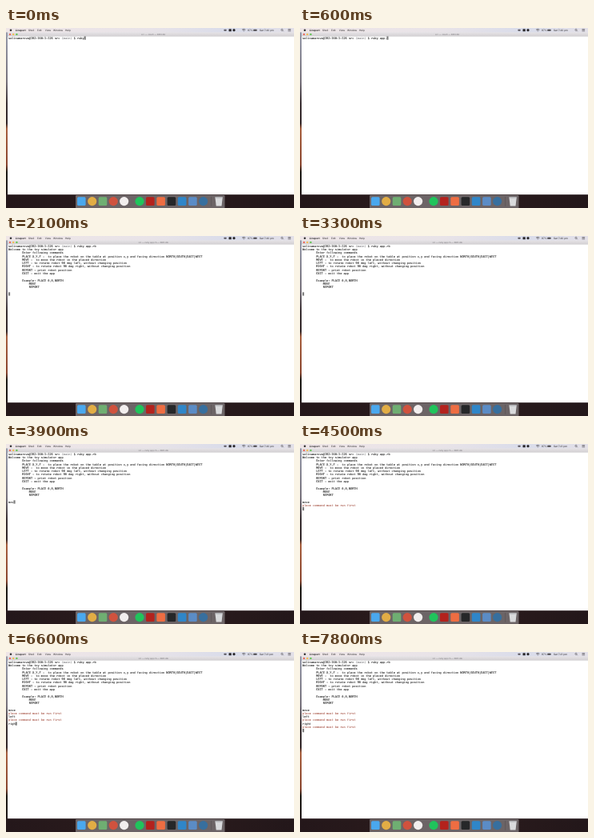
An HTML page that plays this animation: 360 px wide and 225 px high, repeating every 8 s.

```html
<!DOCTYPE html>
<html lang="en">
<head>
<meta charset="utf-8">
<title>Toy simulator session</title>
<style>
html, body { margin: 0; width: 100%; height: 100%; overflow: hidden; background: #22171a; }
svg { display: block; width: 100%; height: 100%; }
text { white-space: pre; text-rendering: geometricPrecision; fill: currentColor; }
.ui { font: 3.15px Inter, "Open Sans", sans-serif; color: #2c2a2d; }
.mono { font: 3.571px "DejaVu Sans Mono", monospace; color: #2e2e2e; stroke: currentColor; stroke-width: .1px; }
.bold { font-weight: 700; }
.title { font-size: 2.7px; color: #77757a; text-anchor: middle; }
.error { color: #ad5f52; }
.dim { color: #808084; }
</style>
</head>
<body>
<svg viewBox="0 0 360 225" preserveAspectRatio="none">
  <defs>
    <linearGradient id="edge" x2="0" y2="1">
      <stop offset="0" stop-color="#9a9fb0"/>
      <stop offset=".3" stop-color="#77727c"/>
      <stop offset=".42" stop-color="#3a3033"/>
      <stop offset=".53" stop-color="#33282a"/>
      <stop offset=".56" stop-color="#a8603f"/>
      <stop offset=".76" stop-color="#8a4630"/>
      <stop offset=".8" stop-color="#1d1b17"/>
      <stop offset="1" stop-color="#22171a"/>
    </linearGradient>
    <linearGradient id="floor">
      <stop offset="0" stop-color="#24171a"/>
      <stop offset=".5" stop-color="#2c1c1d"/>
      <stop offset="1" stop-color="#23171a"/>
    </linearGradient>
    <linearGradient id="menu">
      <stop offset="0" stop-color="#efe6e7"/>
      <stop offset=".5" stop-color="#e8e3e8"/>
      <stop offset=".78" stop-color="#d9dcea"/>
      <stop offset="1" stop-color="#e3e0e8"/>
    </linearGradient>
    <linearGradient id="bar" x2="0" y2="1">
      <stop offset="0" stop-color="#e6e3e6"/>
      <stop offset="1" stop-color="#d3d0d3"/>
    </linearGradient>
  </defs>
  <rect width="360" height="225" fill="url(#edge)"/>
  <rect y="207" width="360" height="18" fill="url(#floor)"/>
  <rect x="2" y="5.3" width="358" height="202.9" fill="#fff"/>
  <rect x="2" y="5.3" width="358" height="5" fill="url(#bar)"/>
  <rect x="2" y="10.1" width="358" height=".3" fill="#b9b6b9"/>
  <rect width="360" height="5.4" fill="url(#menu)"/>
  <g id="chrome"></g>
  <g id="dock"></g>
  <g id="screen"></g>
</svg>
<script>
const LOOP = 8000, STEP = 300;
const CHAR = 2.15, LINE = 4.28, LEFT = 3, BASE = 13.7;
const $ = id => document.getElementById(id);

function add(parent, tag, attrs, content) {
  const el = document.createElementNS("http://www.w3.org/2000/svg", tag);
  for (const key in attrs) el.setAttribute(key, attrs[key]);
  if (content !== undefined) el.textContent = content;
  return parent.appendChild(el);
}

const chrome = $("chrome"), dock = $("dock"), screen = $("screen");
const label = (x, s, cls = "ui") => add(chrome, "text", { x, y: 3.9, class: cls }, s);

// Menu bar and window buttons
add(chrome, "circle", { cx: 6, cy: 2.7, r: 1.3, fill: "#333" });
label(11.8, "Lineport", "ui bold");
[[28, "Shell"], [39, "Edit"], [48.8, "View"], [59, "Window"], [74, "Help"]]
  .forEach(([x, s]) => label(x, s));
["#ee6a5f", "#f5bd4f", "#61c455"].forEach((fill, i) =>
  add(chrome, "circle", { cx: 5 + i * 4.2, cy: 7.9, r: 1.2, fill }));

// Status icons
add(chrome, "rect", { x: 272.5, y: 1.8, width: 3, height: 1.9, rx: .4, fill: "#57545c" });
add(chrome, "rect", { x: 278.5, y: 1.2, width: 3.2, height: 3.1, rx: .5, fill: "#29272a" });
add(chrome, "circle", { cx: 285, cy: 2.7, r: 1.6, fill: "#29272a" });
add(chrome, "path", { d: "M295 2.2q2.2-1.8 4.4 0M296 3.1q1.2-1 2.4 0", fill: "none", stroke: "#39363a", "stroke-width": .6 });
add(chrome, "circle", { cx: 297.2, cy: 3.9, r: .4, fill: "#39363a" });
label(302, "97%");
add(chrome, "rect", { x: 309.3, y: 1.8, width: 4.2, height: 2, rx: .4, fill: "#4a474b" });
const clock = label(317, "");
add(chrome, "circle", { cx: 345, cy: 2.4, r: 1.1, fill: "none", stroke: "#39363a", "stroke-width": .5 });
add(chrome, "path", { d: "M345.8 3.2l1.1 1.1M352.5 1.5h3.6M352.5 2.7h3.6M352.5 3.9h3.6", stroke: "#39363a", "stroke-width": .5 });
const title = add(chrome, "text", { x: 184, y: 8.8, class: "ui title" });

// Dock: centre, shape, colour
add(dock, "rect", { x: 87, y: 209, width: 186.5, height: 16.5, rx: 1.2, fill: "#6c6466" });
[
  [94.3, "square", "#4aa8ee"], [107.7, "circle", "#e2ad45"], [121, "square", "#6fae72"],
  [134.2, "circle", "#d0523e"], [147.6, "circle", "#f2eeee"], [167, "circle", "#20c45c"],
  [180.3, "square", "#b3221d"], [193.6, "square", "#ee6d42"], [206.9, "square", "#262729"],
  [220.1, "square", "#2f86c9"], [233.4, "square", "#5b8cc6"], [246.6, "circle", "#376f9e"]
].forEach(([x, shape, fill]) => shape === "circle"
  ? add(dock, "circle", { cx: x, cy: 216.6, r: 5.6, fill })
  : add(dock, "rect", { x: x - 5.3, y: 211.3, width: 10.6, height: 10.6, rx: 1.5, fill }));
add(dock, "rect", { x: 256.2, y: 210.8, width: .4, height: 12, fill: "#4f484a" });
add(dock, "path", { d: "M261.4 211.5h9.4l-1.3 11h-6.8z", fill: "#d9dadc" });
add(dock, "ellipse", { cx: 266.1, cy: 211.8, rx: 4.7, ry: .9, fill: "#b4b5b9" });

const PROMPT = "selinamarova@192-168-1-126 src ";
const ERROR = "place command must be run first";
const HELP = `Welcome to the toy simulator app
        Enter following commands
        PLACE X,Y,F -  to place the robot on the table at position x,y and facing direction NORTH|SOUTH|EAST|WEST
        MOVE -  to move the robot in the placed direction
        LEFT - to rotate robot 90 deg left, without changing position
        RIGHT - to rotate robot 90 deg right, without changing position
        REPORT - print robot position
        EXIT - exit the app

        Example: PLACE 0,0,NORTH
            MOVE
            REPORT
`.split("\n");

// Letters shown at each step after the start time, and the time of the reply
const START = { text: "ruby app.rb", from: 0, counts: [4, 6, 9, 11], enter: 1500 };
const INPUTS = [
  { text: "move", from: 3600, counts: [1, 3, 4], enter: 4500 },
  { text: "left", from: 5100, counts: [2, 4], enter: 5700 },
  { text: "right", from: 6300, counts: [2, 4, 5], enter: 7200 }
];

function typed({ text, from, counts }, t) {
  if (t < from) return "";
  const i = Math.min(Math.floor((t - from) / STEP), counts.length - 1);
  return text.slice(0, counts[i]);
}

function render(t) {
  screen.replaceChildren();
  let row = 0, col = 0;
  const write = (s, cls = "") => {
    if (s) add(screen, "text", { x: LEFT + col * CHAR, y: BASE + row * LINE, class: "mono " + cls }, s);
    col += s.length;
  };
  const line = (s, cls) => { write(s, cls); row++; col = 0; };

  write(PROMPT);
  write("(main)", "dim");
  write(" $ " + typed(START, t));
  const running = t >= START.enter;
  if (running) {
    line("");
    HELP.forEach(s => line(s));
    for (const input of INPUTS) {
      if (t < input.from) break;
      if (t < input.enter) { write(typed(input, t)); break; }
      line(input.text);
      line(ERROR, "error");
    }
  }
  add(screen, "rect", { x: LEFT + col * CHAR, y: BASE - 3.3 + row * LINE, width: CHAR, height: LINE, fill: "#7d7d7d" });
  title.textContent = running ? "src — ruby app.rb — 265×46" : "src — -bash — 265×46";
  clock.textContent = t < 4200 ? "Sat 7:40 pm" : "Sat 7:41 pm";
}

let shown = -1;
function tick() {
  const step = Math.floor(performance.now() % LOOP / STEP);
  if (step !== shown) render((shown = step) * STEP);
  requestAnimationFrame(tick);
}
tick();
</script>
</body>
</html>
```
